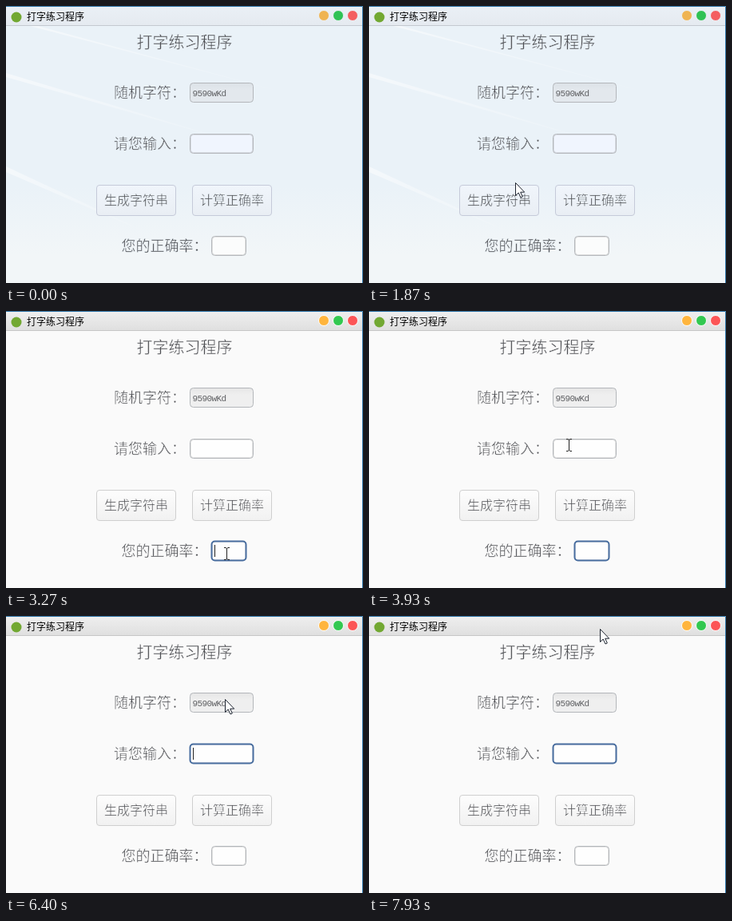
An HTML page for the animation above (8 s loop, 447 by 347 pixels).

```html
<!DOCTYPE html>
<html lang="zh-CN">
<head>
<meta charset="utf-8">
<title>打字练习程序</title>
<style>
  html, body { margin: 0; width: 100%; height: 100%; overflow: hidden; }
  svg {
    display: block; width: 447px; height: 347px;
    --bar1: #eaf0f6; --bar2: #e5eaf0; --line: #c4c9d0;
    --bg1: #eaf2f8; --bg2: #f2f6f8;
    --btn1: #f0f5fb; --btn2: #e9eef4; --edge: #c5cad9;
    --off1: #dce2e7; --off2: #e3e8ed; --box: #f0f5fe; --result: #fbfcfc;
    --amber: #efb452; --green: #2fc254; --red: #f45e60; --ring: #edf1f5;
  }
  svg.plain {
    --bar1: #efefef; --bar2: #dfdfdf; --line: #c6c6c6;
    --bg1: #fafafa; --bg2: #fafafa;
    --btn1: #fdfdfd; --btn2: #f1f1f1; --edge: #cfcfcf;
    --off1: #e6e6e6; --off2: #efefef; --box: #fefefe; --result: #fefefe;
    --amber: #ffb53d; --green: #32c850; --red: #fc5556; --ring: #fff;
  }
  .plain #streaks { display: none; }
  /* a hairline in the backdrop colour thins the glyphs */
  text { font-family: "Noto Sans CJK SC", "Noto Sans CJK", sans-serif; fill: #4e4f53; stroke: var(--bg1); stroke-width: .45px; }
  .caption { font-size: 12px; fill: #000; stroke: none; }
  .head { font-size: 20px; }
  .label { font-size: 18px; }
  .button text { font-size: 16px; }
  .code { font: 11px "Liberation Mono", monospace; letter-spacing: -.6px; fill: #5f6063; stroke: none; }
  .button rect { fill: url(#btn); stroke: var(--edge); }
  .button.hover rect { fill: url(#hot); stroke: #cfa467; }
  .button.hover text { stroke: #efba6d; }
  .field .body { stroke: #b3b6ba; }
  .field .inner { fill: none; stroke: #000; stroke-opacity: .1; }
  .field.focus .body { stroke: #486d9f; stroke-width: 2; }
  .field.focus .inner { stroke-opacity: .03; }
  .caret { stroke: #222; }
</style>
</head>
<body>
<svg id="stage" viewBox="0 0 447 347">
  <defs>
    <linearGradient id="bar" x2="0" y2="1">
      <stop stop-color="var(--bar1)"/><stop offset="1" stop-color="var(--bar2)"/>
    </linearGradient>
    <linearGradient id="bg" x2="0" y2="1">
      <stop offset=".65" stop-color="var(--bg1)"/><stop offset=".9" stop-color="var(--bg2)"/>
    </linearGradient>
    <linearGradient id="btn" x2="0" y2="1">
      <stop stop-color="var(--btn1)"/><stop offset="1" stop-color="var(--btn2)"/>
    </linearGradient>
    <linearGradient id="hot" x2="0" y2="1">
      <stop stop-color="#f0c384"/><stop offset="1" stop-color="#eeae52"/>
    </linearGradient>
    <linearGradient id="off" x2="0" y2="1">
      <stop stop-color="var(--off1)"/><stop offset=".35" stop-color="var(--off2)"/>
    </linearGradient>
    <linearGradient id="fade">
      <stop stop-color="#fff" stop-opacity=".5"/><stop offset="1" stop-color="#fff" stop-opacity="0"/>
    </linearGradient>
  </defs>

  <rect width="447" height="347" fill="url(#bg)"/>
  <g id="streaks" fill="url(#fade)">
    <path d="M40 25L385 118L30 25Z"/>
    <path d="M0 84L320 180L0 89Z"/>
    <path d="M0 201L190 290L0 208Z"/>
  </g>

  <rect width="447" height="25" fill="url(#bar)"/>
  <path d="M0 24.5H447" stroke="var(--line)"/>
  <path d="M0 .5H446.5V347" fill="none" stroke="#2d74a8"/>
  <circle cx="13" cy="14" r="6.5" fill="#72a832"/>
  <text class="caption" x="26" y="18">打字练习程序</text>
  <g stroke="var(--ring)">
    <circle cx="398" cy="12" r="6.5" fill="var(--amber)"/>
    <circle cx="416" cy="12" r="6.5" fill="var(--green)"/>
    <circle cx="434" cy="12" r="6.5" fill="var(--red)"/>
  </g>

  <text class="head" x="163.5" y="53">打字练习程序</text>
  <text class="label" x="135" y="115">随机字符：</text>
  <text class="label" x="135" y="179">请您输入：</text>
  <text class="label" x="144.5" y="307">您的正确率：</text>

  <g class="field">
    <rect class="body" x="230.5" y="96.5" width="79" height="24" rx="4" fill="url(#off)"/>
    <text class="code" x="233.5" y="113">9590wKd</text>
  </g>
  <g class="field" id="input">
    <rect class="body" x="230.5" y="160.5" width="79" height="24" rx="4" fill="var(--box)"/>
    <rect class="inner" x="231.5" y="161.5" width="77" height="22" rx="3"/>
    <path class="caret" d="M234.5 165V180"/>
  </g>
  <g class="field" id="result">
    <rect class="body" x="257.5" y="288.5" width="43" height="24" rx="4" fill="var(--result)"/>
    <rect class="inner" x="258.5" y="289.5" width="41" height="22" rx="3"/>
    <path class="caret" d="M261.5 293V308"/>
  </g>

  <g class="button" id="make">
    <rect x="113.5" y="224.5" width="99" height="38" rx="3.5"/>
    <text x="123" y="249">生成字符串</text>
  </g>
  <g class="button" id="score">
    <rect x="233.5" y="224.5" width="99" height="38" rx="3.5"/>
    <text x="243" y="249">计算正确率</text>
  </g>

  <path id="arrow" d="M.5 .5V16.5L4.2 13L7 19L9.3 18L6.7 12.2H11.7Z" fill="#fff" stroke="#1d2430" stroke-linejoin="round"/>
  <path id="beam" d="M-3 -7.5H-1L.5 -6.5L2 -7.5H4M.5 -6.5V6.5M-3 7.5H-1L.5 6.5L2 7.5H4" fill="none" stroke="#222"/>
</svg>
<script>
  const LOOP = 8000, RATE = 15; // the screen is sampled 15 times a second
  const ENTER = 17, FOCUS_RESULT = 49, FOCUS_INPUT = 60, BLINK = RATE / 2;

  const $ = id => document.getElementById(id);
  const show = (el, on) => el.setAttribute("visibility", on ? "visible" : "hidden");
  const ease = u => u * u * (3 - 2 * u);

  // Each move eases from the last resting point; lift bows its path upwards.
  const moves = [];
  const go = (from, to, x, y, lift = 0) => moves.push({ from, to, x, y, lift });

  go(16, 28, 183, 221, 112);   // in from the left edge
  go(28, 31, 157, 245);        // over the first button
  go(33, 38, 261, 245, -12);   // second button
  go(41, 47, 276, 304);        // result field
  go(52, 59, 250, 168);        // input field
  go(64, 71, 242, 102);        // random string
  go(72, 74, 253, 108);
  go(79.3, 83, 297, 108);
  for (let i = 0; i < 3; i++)  // sweep back and forth along the string
    go(83 + 7 * i, 86 + 7 * i, i % 2 ? 274 : 182, 104);
  go(102, 108, 242, 107);
  go(108, 112, 211, 86);       // swing up to the title bar
  go(112, 119, 289, 16);

  function pointerAt(tick) {
    let p = { x: 1, y: 287 };
    for (const m of moves) {
      if (tick <= m.from) break;
      const u = Math.min(1, (tick - m.from) / (m.to - m.from)), e = ease(u);
      p = {
        x: p.x + (m.x - p.x) * e,
        y: p.y + (m.y - p.y) * e - m.lift * Math.sin(Math.PI * e)
      };
    }
    return { x: Math.round(p.x), y: Math.round(p.y) };
  }

  function over(id, p) {
    const b = $(id).querySelector("rect").getBBox();
    return p.x >= b.x && p.x <= b.x + b.width && p.y >= b.y && p.y <= b.y + b.height;
  }

  function setFocus(id, on, since, tick) {
    const lit = Math.floor((tick - since) / BLINK) % 2 === 0;
    $(id).classList.toggle("focus", on);
    show($(id).querySelector(".caret"), on && lit);
  }

  function draw(ms) {
    const tick = Math.floor((ms % LOOP + 4) * RATE / 1000);
    const p = pointerAt(tick), seen = tick >= ENTER;
    const typing = over("input", p) || over("result", p);

    $("stage").classList.toggle("plain", tick >= FOCUS_RESULT);
    for (const id of ["make", "score"])
      $(id).classList.toggle("hover", seen && over(id, p));
    setFocus("result", tick >= FOCUS_RESULT && tick < FOCUS_INPUT, FOCUS_RESULT, tick);
    setFocus("input", tick >= FOCUS_INPUT, FOCUS_INPUT, tick);

    for (const id of ["arrow", "beam"]) {
      $(id).setAttribute("transform", `translate(${p.x} ${p.y})`);
      show($(id), seen && typing === (id === "beam"));
    }
  }

  const start = performance.now();
  function loop() {
    draw(performance.now() - start);
    requestAnimationFrame(loop);
  }
  loop();
</script>
</body>
</html>
```
